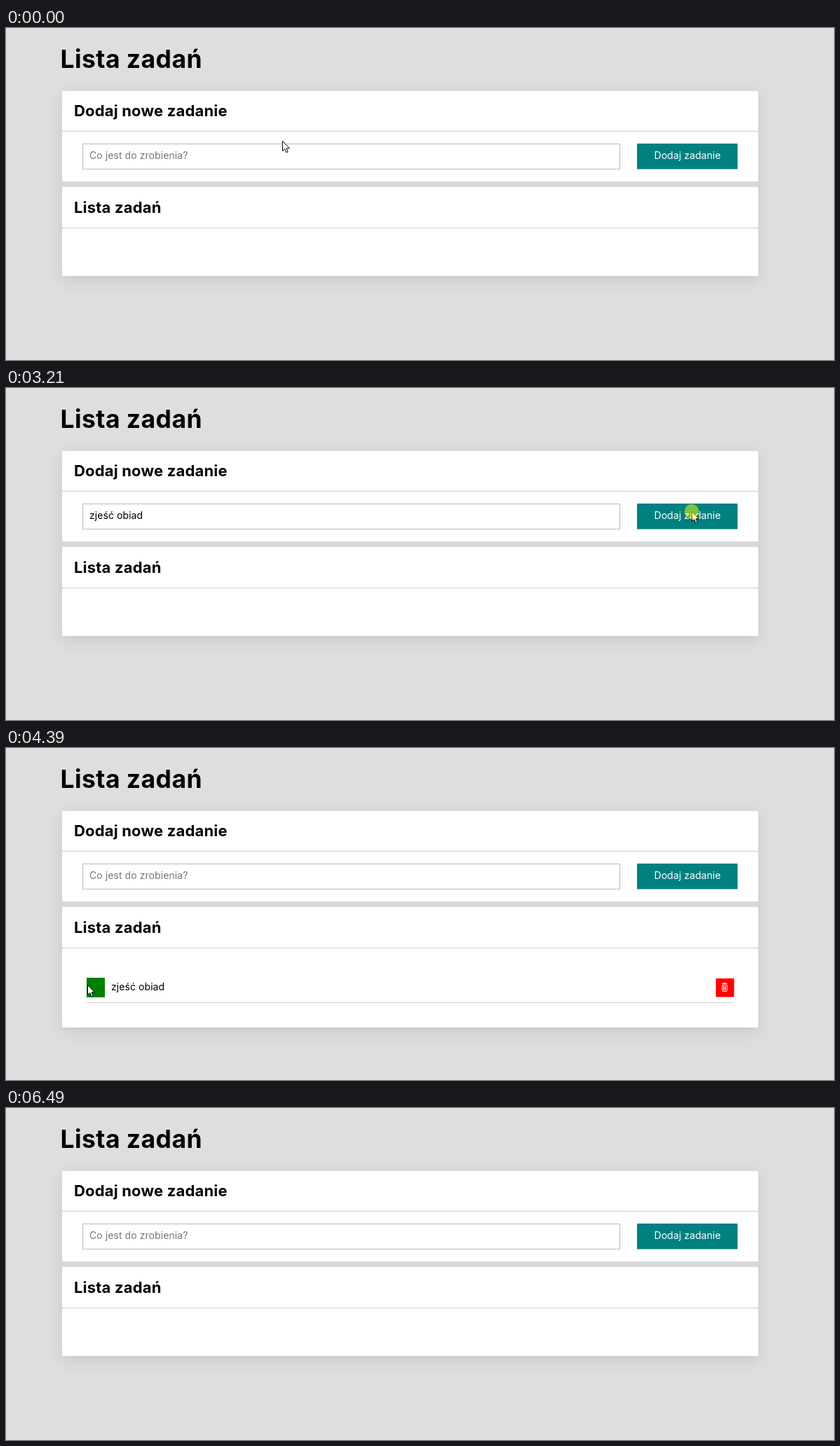
Recreate the animation shown at these times as an HTML page. Size 1181 by 474 pixels, loop 6730 ms.

```html
<!DOCTYPE html>
<html lang="pl">
<head>
<meta charset="utf-8">
<title>Lista zadań</title>
<style>
  html, body { margin: 0; width: 100%; height: 100%; overflow: hidden; background: #dfdddd; }
  svg { display: block; width: 1181px; height: 474px; }
  text { font: 14px Inter, sans-serif; letter-spacing: .005em; white-space: pre; }
  .title { font-size: 35.5px; font-weight: 700; letter-spacing: .012em; }
  .head { font-size: 22px; font-weight: 700; letter-spacing: .008em; }
  .line { stroke: #ccc; }
  .done { text-decoration: line-through; }
</style>
</head>
<body>
<svg viewBox="0 0 1181 474">
  <defs>
    <filter id="shadow" x="-10%" y="-30%" width="120%" height="160%">
      <feDropShadow dx="0" dy="6" stdDeviation="10" flood-color="#000" flood-opacity=".1"/>
    </filter>
  </defs>
  <text class="title" x="77.5" y="57">Lista zadań</text>

  <rect id="panel" x="80" y="90" width="993" height="264" fill="#dad7d8" filter="url(#shadow)"/>
  <rect x="80" y="90" width="993" height="129" fill="#fff"/>
  <rect id="list" x="80" y="227" width="993" height="127" fill="#fff"/>
  <path class="line" d="M80 147.5H1073M80 285.5H1073"/>
  <text class="head" x="97" y="125.5">Dodaj nowe zadanie</text>
  <text class="head" x="97" y="264">Lista zadań</text>

  <rect id="box" fill="#fff"/>
  <text id="field" x="119" y="187"></text>
  <path id="caret" stroke="#000"/>
  <rect x="900" y="165" width="143.5" height="36.5" fill="#008080"/>
  <text x="972" y="187" text-anchor="middle" fill="#fff">Dodaj zadanie</text>

  <g id="item">
    <rect x="115" y="328" width="26" height="28" fill="#008000"/>
    <path id="tick" d="M123 342.5l3.5 4 6.5-9" fill="none" stroke="#fff" stroke-width="2"/>
    <text id="task" x="150" y="346">zjeść obiad</text>
    <rect x="1012.5" y="329" width="26" height="26.5" fill="#f00"/>
    <path d="M1021.5 338.5v7.5q0 1.5 1.5 1.5h4q1.5 0 1.5-1.5v-7.5zM1021 336.5h8M1023.5 335.5h3M1023.5 340v6M1025 340v6M1026.5 340v6"
      fill="none" stroke="#fff" stroke-width=".9"/>
    <path class="line" d="M115 363.5H1038"/>
  </g>

  <g id="cursor">
    <path id="arrow" d="M.5 .5V14.6L3.7 11.6L5.9 16.7L8.1 15.8L6 10.8H10.3Z" fill="#fff" stroke="#000"/>
    <path id="beam" d="M-3 -6.5H-.8L0 -6L.8 -6.5H3M0 -6V6M-3 6.5H-.8L0 6L.8 6.5H3" fill="none" stroke="#222"/>
    <circle id="click" r="10.3" fill="#ff0" fill-opacity=".5"/>
  </g>
</svg>
<script>
const LOOP = 6730;
const TASK = 'zjeść obiad';
const HINT = 'Co jest do zrobienia?';

// Mouse presses; each is held for PRESS ms
const PRESS = 140;
const CLICK = { field: 280, add: 3200, check: 3930, uncheck: 4250, remove: 6050 };

// Pointer trips; bend bows the path downwards
const HOME = { x: 394, y: 161 };
const TRIPS = [
  { from: 70, to: 280, x: 320, y: 178 },
  { from: 2420, to: 2540, x: 920, y: 138 },
  { from: 2720, to: 2860, x: 978, y: 176 },
  { from: 3320, to: 3820, x: 115, y: 354, bend: 180 },
  { from: 3890, to: 3930, x: 116, y: 338 },
  { from: 4870, to: 5150, x: 435, y: 331 },
  { from: 5220, to: 5740, x: 1023, y: 342 },
  { from: 6190, to: 6310, x: 1178, y: 466 }
];

const $ = id => document.getElementById(id);
const within = (t, a, b) => t >= a && t < b;
const show = (id, on) => $(id).setAttribute('display', on ? 'inline' : 'none');
const set = (id, attrs) => {
  for (const name in attrs) $(id).setAttribute(name, attrs[name]);
};

// Slow start, faster last word
function typedCount(t) {
  if (t < 720) return 0;
  return t < 1690 ? 1 + Math.floor((t - 720) / 162) : 7 + Math.floor((t - 1690) / 90);
}

function pointer(t) {
  let { x, y } = HOME;
  for (const trip of TRIPS) {
    if (t < trip.from) break;
    const k = Math.min(1, (t - trip.from) / (trip.to - trip.from));
    x += (trip.x - x) * k;
    y += (trip.y - y) * k + (trip.bend || 0) * Math.sin(Math.PI * k);
  }
  return [Math.round(x), Math.round(y)];
}

function drawField(t) {
  const focus = within(t, CLICK.field, CLICK.add);
  const typed = t < CLICK.add + PRESS ? TASK.slice(0, typedCount(t)) : '';
  const field = $('field');
  field.textContent = typed || HINT;
  set('field', { fill: typed ? '#000' : '#757575' });
  set('box', focus
    ? { x: 110, y: 166, width: 765, height: 35, rx: 2, stroke: '#101010', 'stroke-width': 2 }
    : { x: 109.5, y: 165.5, width: 766, height: 36, rx: 0, stroke: '#bbb', 'stroke-width': 1 });
  const x = Math.round(119 + (typed ? field.getComputedTextLength() : 0)) + .5;
  set('caret', { d: `M${x} 175V191` });
  show('caret', focus && t < 2480);
}

function drawList(t) {
  const filled = within(t, CLICK.add + PRESS, CLICK.remove + PRESS);
  const done = within(t, CLICK.check + PRESS, CLICK.uncheck + PRESS);
  const grow = filled ? 45 : 0;
  set('panel', { height: 264 + grow });
  set('list', { height: 127 + grow });
  show('item', filled);
  show('tick', done);
  $('task').classList.toggle('done', done);
}

function drawCursor(t) {
  const [x, y] = pointer(t);
  const overField = within(x, 110, 876) && within(y, 166, 202);
  set('cursor', { transform: `translate(${x} ${y})` });
  show('cursor', t < 6490);
  show('arrow', !overField);
  show('beam', overField);
  show('click', Object.values(CLICK).some(c => within(t, c, c + PRESS)));
}

const start = performance.now();
function frame() {
  const t = (performance.now() - start) % LOOP;
  drawField(t);
  drawList(t);
  drawCursor(t);
  requestAnimationFrame(frame);
}
frame();
</script>
</body>
</html>
```
